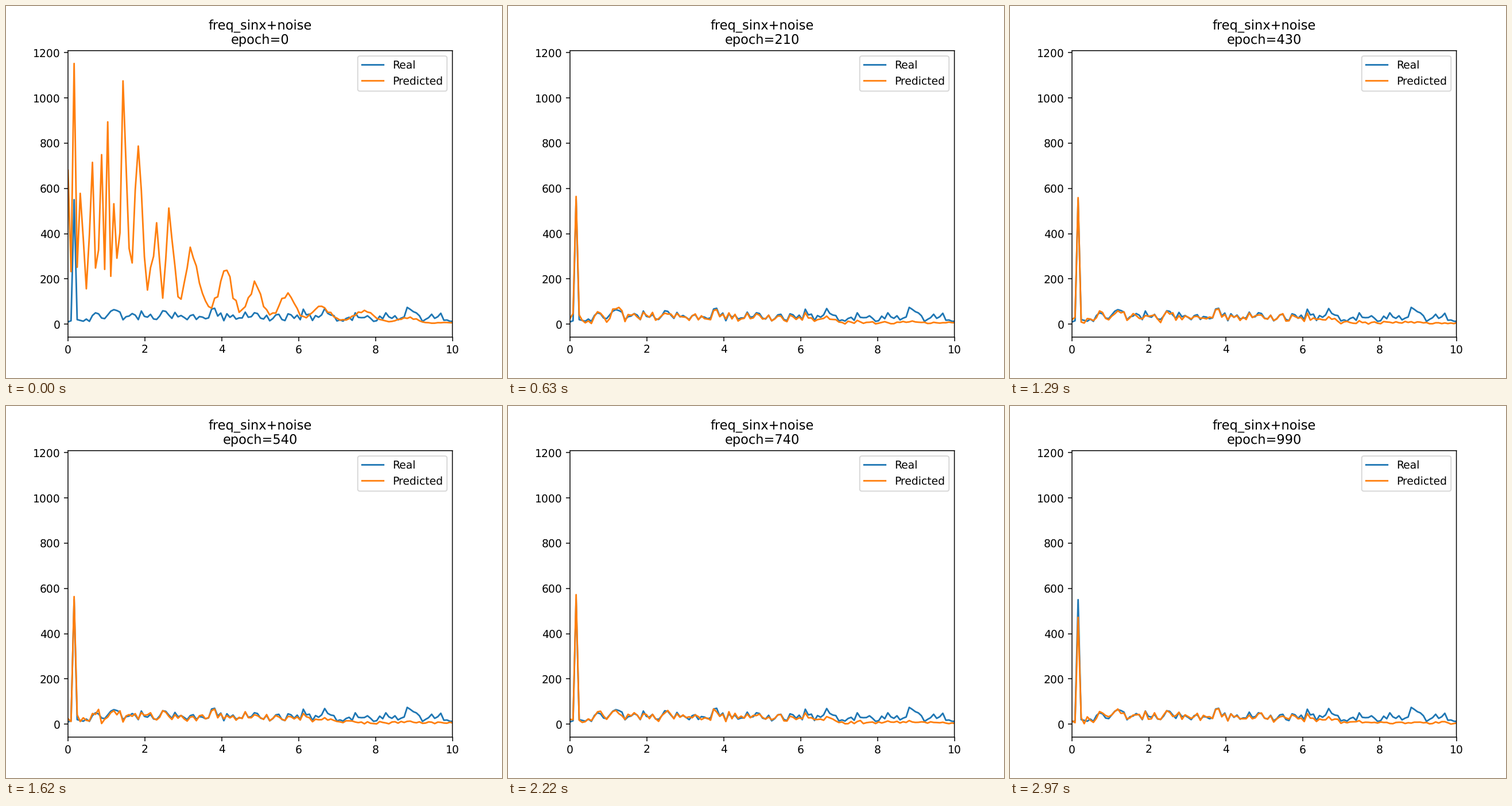
These frames come from a looping animation (864x648 px, 3 s). A matplotlib script:

```python
import numpy as np
import matplotlib.pyplot as plt
from matplotlib.animation import FuncAnimation

# Unhinted text and unsnapped edges give resolution-independent layout
plt.rcParams.update({"text.hinting": "no_hinting", "path.snap": False})

FRAMES, INTERVAL, EPOCH_STEP = 100, 30, 10
SAMPLES = 1000
SINE_BIN = 2

BINS = np.arange(127)
FREQ = BINS * (SAMPLES - 1) / (SAMPLES * 4 * np.pi)
rng = np.random.default_rng(4)


def jagged(peaks, depth, rough):
    """Line through the peaks with valleys between them, broken up by noise."""
    at, height = list(peaks), list(peaks.values())
    phase = np.interp(BINS, at, np.arange(len(at)))
    valley = 1 - depth * np.sin(np.pi * phase) ** 2
    level = np.interp(BINS, at, height) * valley
    level *= rng.uniform(1 - rough, 1, len(BINS))
    level[at] = height
    return level


real = jagged({0: 10, 1: 15, SINE_BIN: 550, 3: 20, 9: 50, 15: 64, 24: 58,
               31: 59, 48: 70, 58: 53, 77: 66, 84: 69, 94: 50, 104: 50,
               111: 74, 122: 48, 126: 12}, depth=0.25, rough=0.75)

untrained = jagged({0: 680, SINE_BIN: 1152, 4: 578, 8: 715, 11: 749, 13: 894,
                    15: 532, 18: 1075, 23: 787, 29: 448, 33: 513, 40: 340,
                    52: 238, 61: 190, 72: 138, 83: 79, 97: 61, 112: 31,
                    126: 6}, depth=0.7, rough=0.3)

# The trained model follows the low frequencies and misses the high ones
trained = real * (0.12 + 0.75 / (1 + np.exp((BINS - 82) / 6))) + 3
spread = 2.5 + 9 * np.exp(-BINS / 40) + 25 * np.exp(-BINS)


def predict(i):
    """Spectrum predicted after i steps of training."""
    if i == 0:
        return untrained
    noise = np.random.default_rng(i)
    goal = trained + spread * noise.standard_normal(len(BINS))
    goal[SINE_BIN] = np.interp(i * EPOCH_STEP, [130, 430, 830, 970, 990],
                               [566, 559, 576, 566, 472])
    fade = np.exp(-i / 2.5) * noise.uniform(0.5, 1.5, len(BINS))
    return np.abs(goal + (untrained - goal) * fade)


def caption(i):
    return f"freq_sinx+noise\nepoch={i * EPOCH_STEP}"


fig, ax = plt.subplots(figsize=(6.4, 4.8), dpi=135)
ax.plot(FREQ, real, label="Real")
predicted, = ax.plot(FREQ, untrained, label="Predicted")
ax.set_xlim(0, 10)
ax.set_ylim(-57.2, 1208.8)
ax.legend(loc="upper right")
title = ax.set_title(caption(0))


def update(i):
    predicted.set_ydata(predict(i))
    title.set_text(caption(i))
    return predicted, title


anim = FuncAnimation(fig, update, frames=FRAMES, interval=INTERVAL,
                     repeat=True, repeat_delay=0)
plt.show()
```
